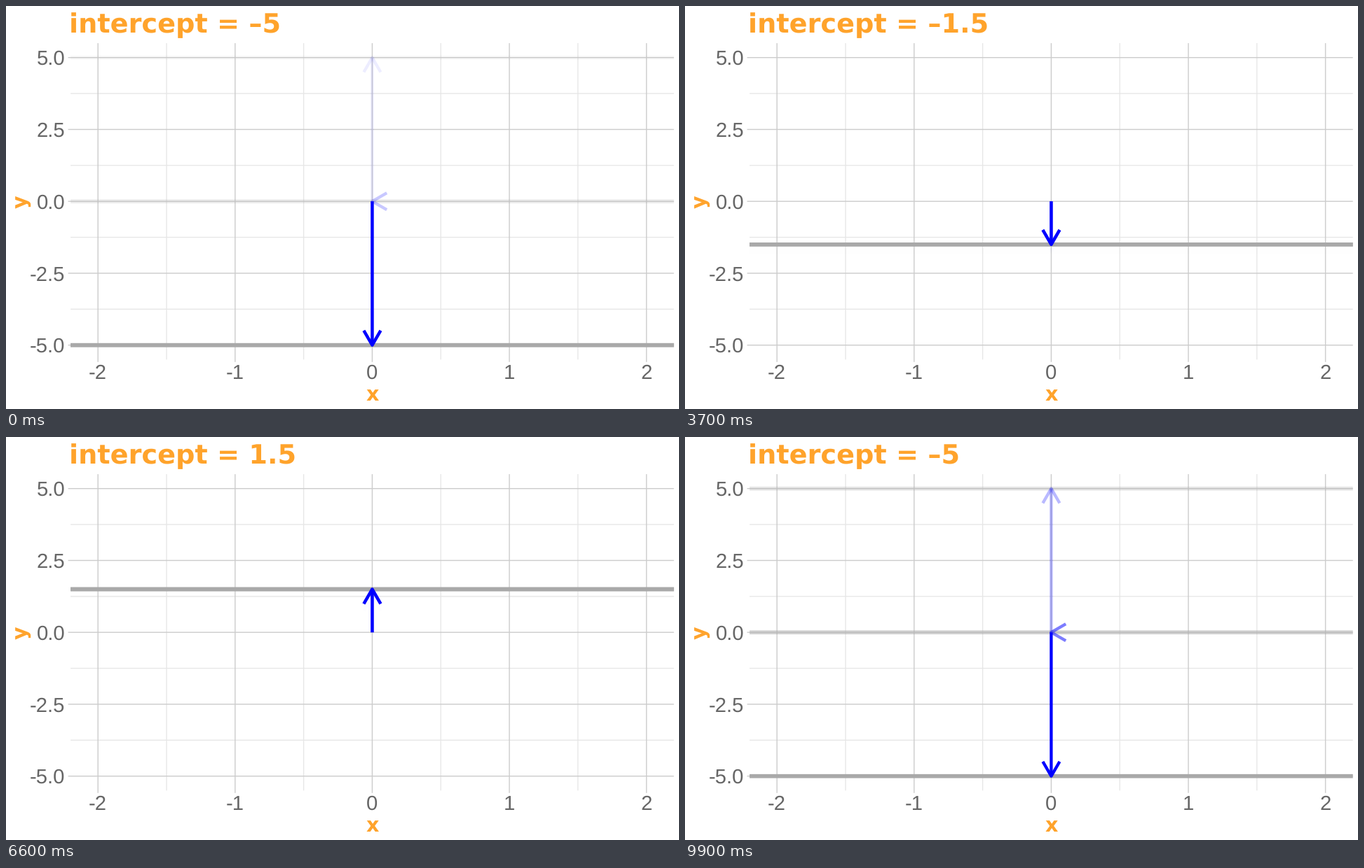
Write a matplotlib script that moves like this. It is 960 by 576 pixels and loops after 10000 ms.

```python
import matplotlib.pyplot as plt
import numpy as np
from matplotlib.animation import FuncAnimation

W, H, DPI = 960, 576, 100
PX = 72 / DPI                     # points per pixel
ORANGE, BLUE, GREY = "#ffa32b", "#0000ff", "#a9a9a9"
MAJOR, MINOR, TEXT = "#cccccc", "#e6e6e6", "#666666"
LEFT, RIGHT, TOP, BOTTOM = 92.1, 952.7, 53.1, 505.3
X0, Y0, XU, YU = 522.4, 279.2, 195.6, 41.1
FRAMES, WAKE, HEAD = 100, 5, 24

plt.rcParams["text.hinting"] = "none"
fig = plt.figure(figsize=(W / DPI, H / DPI), dpi=DPI, facecolor="white")
ax = fig.add_axes([0, 0, 1, 1])
ax.set(xlim=(0, W), ylim=(H, 0))
ax.axis("off")


def line(xs, ys, color, width, z, alpha=1):
    item, = ax.plot(xs, ys, color=color, lw=width * PX, zorder=z, alpha=alpha,
                    snap=False, solid_capstyle="butt", solid_joinstyle="round")
    return item


def tick_label(x, y, text, align):
    ax.text(x, y, text, ha=align, va="baseline", color=TEXT,
            family="Liberation Sans", size=29.3 * PX)


def heading(x, y, text, size, **kw):
    return ax.text(x, y, text, color=ORANGE, family="DejaVu Sans",
                   weight="bold", size=size * PX, **kw)


def draw_axes():
    for v in np.arange(-1.5, 2, 1):
        line([X0 + v * XU] * 2, [TOP, BOTTOM], MINOR, 1.3, 1)
    for v in np.arange(-3.75, 4, 2.5):
        line([LEFT, RIGHT], [Y0 - v * YU] * 2, MINOR, 1.3, 1)
    for v in range(-2, 3):
        x = X0 + v * XU
        line([x, x], [TOP, BOTTOM + 3.5], MAJOR, 1.4, 2)
        tick_label(x, 533, str(v), "center")
    for v in np.arange(-5, 6, 2.5):
        y = Y0 - v * YU
        line([LEFT - 3.5, RIGHT], [y, y], MAJOR, 1.4, 2)
        tick_label(84.5, y + 10.3, f"{v:.1f}", "right")
    heading(X0, 564, "x", 28.5, ha="center", va="baseline")
    heading(22.5, Y0 + 0.3, "y", 28.5, ha="center", va="center", rotation=90)


def build_poses():
    """(line height, heading value) per frame, from the first arrival at -5."""
    states = np.linspace(-5, 5, 21)
    poses = []
    for k, v in enumerate(states):
        # the spare frames run out at the centre and near the end
        hold = 3 if k == 10 or k >= 17 else 4
        halfway = (v + states[(k + 1) % len(states)]) / 2
        poses += [(v, v)] * hold + [(halfway, v)]
    return poses


def head_points(y, v):
    """Open arrow head; an arrow of no length points left."""
    back = np.arctan2(np.sign(v), float(v == 0))
    spread = back + np.array([-np.pi / 6, 0, np.pi / 6])
    reach = HEAD * np.array([1, 0, 1])
    return X0 + reach * np.cos(spread), y + reach * np.sin(spread)


poses = build_poses()
draw_axes()
title = heading(90.5, 38, "", 38.3, ha="left", va="baseline")
wake = []
for lag in range(WAKE):
    alpha = (1 - lag / WAKE) ** 3
    wake.append((line([LEFT, RIGHT], [0, 0], GREY, 5.7, 4 - lag / 10, alpha),
                 line([], [], BLUE, 4.3, 5 - lag / 10, alpha),
                 line([], [], BLUE, 4.3, 5 - lag / 10, alpha)))


def update(i):
    for lag, (level, shaft, head) in enumerate(wake):
        v = poses[(i + 1 - lag) % FRAMES][0]
        y = Y0 - v * YU
        level.set_ydata([y, y])
        shaft.set_data([X0, X0], [Y0, y])
        head.set_data(*head_points(y, v))
    value = poses[(i + 1) % FRAMES][1]
    title.set_text(f"intercept = {value:g}".replace("-", "–"))


anim = FuncAnimation(fig, update, frames=FRAMES, interval=100,
                     init_func=lambda: update(0), repeat=True)
plt.show()
```
